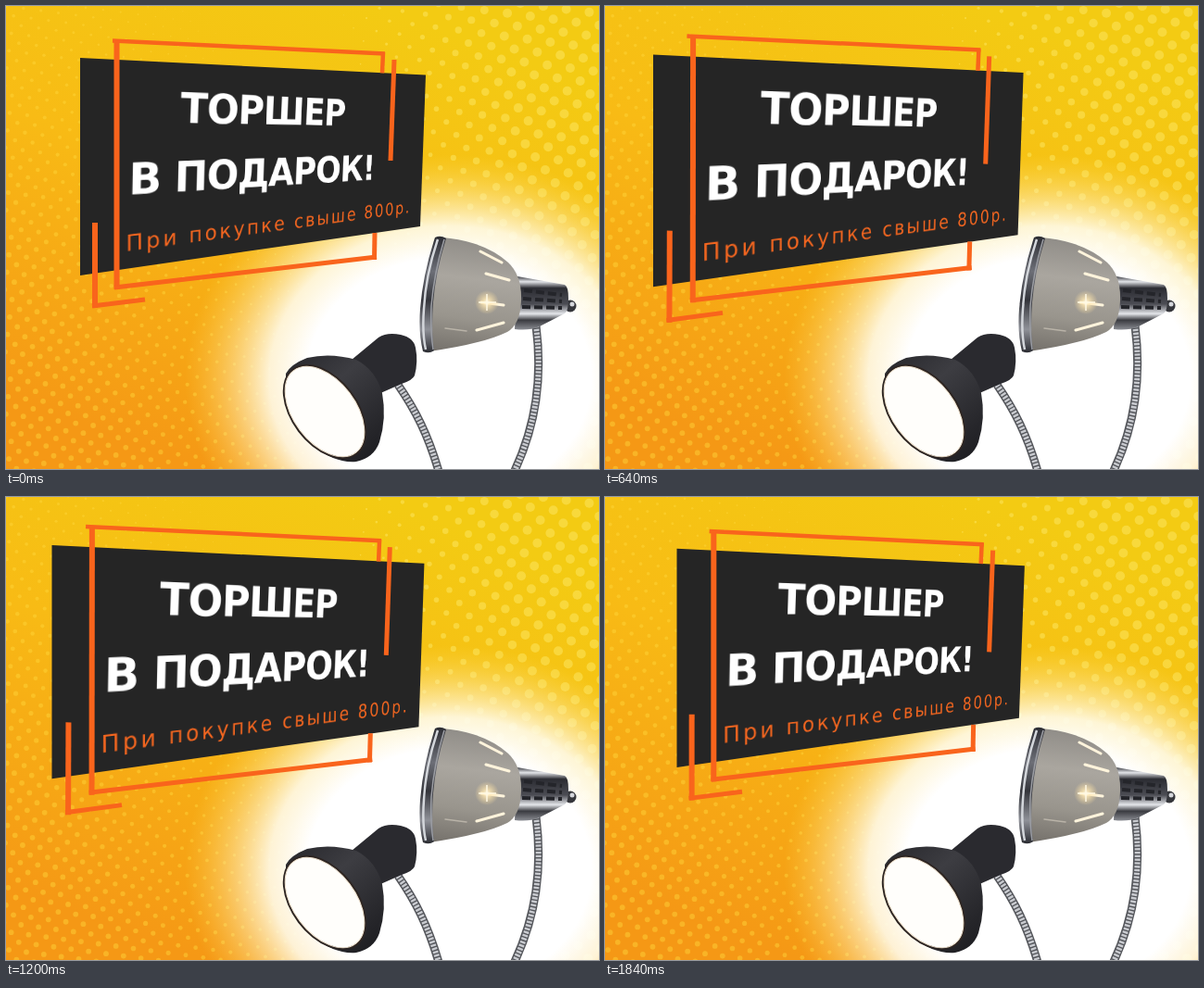
Recreate the animation shown at these times as an HTML page with a canvas. Size 640x500 px, loop 1.92 s.

```html
<!DOCTYPE html>
<html lang="ru">
<head>
<meta charset="utf-8">
<title>Торшер в подарок</title>
<style>
  html, body { margin: 0; width: 100%; height: 100%; overflow: hidden; background: #f5b916; }
  #stage { position: relative; width: 640px; height: 500px; overflow: hidden; }
  #stage > * { position: absolute; left: 0; top: 0; }
  #words { transform-origin: 0 0; overflow: visible; font-family: "DejaVu Sans", sans-serif; text-anchor: middle; }
  .big { font-size: 50px; font-weight: 700; letter-spacing: -1.2px; fill: #fff; }
  .small { font-size: 26px; letter-spacing: 3.3px; fill: #f2651f; }
  #lines { stroke: #f9641c; fill: none; }
</style>
</head>
<body>
<div id="stage">
  <canvas id="back" width="640" height="500"></canvas>
  <svg width="640" height="500" viewBox="0 0 640 500">
    <defs>
      <radialGradient id="glow">
        <stop offset=".54" stop-color="#fff"/>
        <stop offset=".68" stop-color="#fffdf0" stop-opacity=".88"/>
        <stop offset=".82" stop-color="#fff3c0" stop-opacity=".46"/>
        <stop offset="1" stop-color="#ffe060" stop-opacity="0"/>
      </radialGradient>
      <linearGradient id="shade" x1=".4" y1="0" x2=".3" y2="1">
        <stop offset="0" stop-color="#8f8c87"/>
        <stop offset=".35" stop-color="#aaa69f"/>
        <stop offset=".7" stop-color="#99958d"/>
        <stop offset="1" stop-color="#77736d"/>
      </linearGradient>
      <linearGradient id="chrome" x1="0" y1="0" x2="0" y2="1">
        <stop offset="0" stop-color="#3b3c42"/>
        <stop offset=".1" stop-color="#e2e4e8"/>
        <stop offset=".22" stop-color="#2b2c32"/>
        <stop offset=".52" stop-color="#4c4d54"/>
        <stop offset=".7" stop-color="#e4e6ea"/>
        <stop offset=".82" stop-color="#3a3b40"/>
        <stop offset="1" stop-color="#8a8c92"/>
      </linearGradient>
      <linearGradient id="rim" x1="0" y1="0" x2="0" y2="1">
        <stop offset="0" stop-color="#2c2d33"/>
        <stop offset=".3" stop-color="#6d6f77"/>
        <stop offset=".55" stop-color="#34353b"/>
        <stop offset=".8" stop-color="#8f9198"/>
        <stop offset="1" stop-color="#2c2d33"/>
      </linearGradient>
      <linearGradient id="black" x1="0" y1="0" x2=".8" y2="1">
        <stop offset="0" stop-color="#27272b"/>
        <stop offset=".4" stop-color="#3d3d42"/>
        <stop offset="1" stop-color="#1f1f23"/>
      </linearGradient>
      <radialGradient id="bulb">
        <stop offset="0" stop-color="#fffdf0"/>
        <stop offset=".3" stop-color="#ffe9b5" stop-opacity=".8"/>
        <stop offset="1" stop-color="#ffe0a0" stop-opacity="0"/>
      </radialGradient>
    </defs>
    <ellipse cx="478" cy="402" rx="285" ry="242" fill="url(#glow)"/>

    <polygon id="board" fill="#252525"/>
    <g id="lines"></g>

    <g fill="none">
      <g stroke-width="9" stroke="#54565b">
        <path id="cord1" d="M572 345C579 400 573 452 547 506"/>
        <path id="cord2" d="M423 409C441 435 456 463 468 506"/>
      </g>
      <g stroke-width="6" stroke="#c9cbd0" stroke-dasharray="2.4 1.4">
        <path d="M572 345C579 400 573 452 547 506"/>
        <path d="M423 409C441 435 456 463 468 506"/>
      </g>
    </g>

    <g>
      <circle cx="609" cy="324" r="6.5" fill="#35363b"/>
      <circle cx="611" cy="322" r="2.5" fill="#d5d7dc"/>
      <path d="M552 292L603 301Q607 303 607 316Q607 330 603 332L576 346Q565 351 549 349Z" fill="url(#chrome)"/>
      <path d="M559 307L600 312M558 316L600 319M557 325L600 326" stroke="#24252a" stroke-width="4" stroke-dasharray="9 4"/>
      <path d="M471 250Q517 254 542 277Q557 291 556 318Q555 344 541 352Q514 365 457 373Q446 325 471 250Z" fill="url(#shade)"/>
      <path d="M463 250Q469 247 475 251Q464 286 461 320Q459 352 462 372Q457 376 450 373Q445 353 447 327Q450 289 463 250Z" fill="url(#rim)"/>
      <path d="M466 252Q453 290 451 327Q449 353 453 371" fill="none" stroke="#d3d6db" stroke-width="2.5"/>
      <path d="M473 252Q462 288 459 324Q458 351 461 371" fill="none" stroke="#9b9da3" stroke-width="1.5"/>
      <g stroke="#fff4dc" stroke-width="3" stroke-linecap="round">
        <path d="M512 265L535 277M518 289L543 296M513 320L537 323M508 350L537 342"/>
        <path d="M474 348L497 351" stroke="#b9b3a8" stroke-width="1.5"/>
      </g>
      <circle cx="519" cy="320" r="13" fill="url(#bulb)"/>
      <path d="M519 311V329M510 320H529" stroke="#fff9e4" stroke-width="1.5"/>
    </g>

    <g>
      <path d="M373 382L402 358Q411 352 426 355Q440 358 442 369Q445 384 441 399Q439 404 427 408L402 419Z" fill="#2a2a2f"/>
      <path d="M302 397Q307 387 325 380Q350 374 378 382Q399 393 406 418Q411 445 403 471Q397 488 378 492Q354 494 331 474Q300 446 302 397Z" fill="url(#black)"/>
      <g transform="rotate(53 344 438)">
        <ellipse cx="344" cy="438" rx="58" ry="36" fill="#2d2522"/>
        <ellipse cx="344" cy="438" rx="55.5" ry="33.5" fill="#fffefb" stroke="#f3e6d2"/>
      </g>
    </g>
  </svg>
  <svg id="words" width="500" height="235">
    <text class="big" x="230" y="73" transform="rotate(1.4 230 73)">ТОРШЕР</text>
    <text class="big" x="228" y="153" transform="rotate(.8 228 153)">В ПОДАРОК!</text>
    <text class="small" x="264" y="213" transform="rotate(-.5 264 213)">При покупке свыше 800р.</text>
  </svg>
</div>
<script>
const $ = id => document.getElementById(id);
const W = 500, H = 235, STEP = 80, COUNT = 24;

// Each shape: near pose, then far pose
const quad = [[80, 56, 453, 74.5, 447, 238, 80, 291], [41, 51, 451, 71, 445, 251, 41, 308]];
const strokes = [
  [4.5, [115, 37.5, 409, 51.5], [78, 30.5, 404, 46]],
  [6, [119.5, 38, 119.5, 306], [85.5, 30, 85, 326]],
  [5, [117, 304, 400, 271], [82, 323.5, 394, 287]],
  [4.5, [407, 50, 406, 72.3], [402, 45, 401, 68.8]],
  [5, [398, 245, 397.5, 274], [392, 258, 391, 290]],
  [5, [419, 58, 415, 167], [413, 53, 409, 172]],
  [6, [96, 234, 96, 326], [59.5, 246, 59, 348]],
  [5, [93, 324, 150, 317], [56, 345.5, 118, 337]]
];

function paintBack() {
  const c = $('back').getContext('2d');
  const g = c.createLinearGradient(400, 0, 215, 500);
  g.addColorStop(0, '#f3cb13');
  g.addColorStop(.45, '#f8bb15');
  g.addColorStop(1, '#f59815');
  c.fillStyle = g;
  c.fillRect(0, 0, 640, 500);
  dots(c, 12.5, 'rgba(252,226,88,.6)', (x, y) =>
    Math.min(5, (x - 345 - y * .12) / 38));
  dots(c, 9.5, 'rgba(255,214,60,.45)', (x, y) =>
    Math.min(2.9, 3 - x / 150 + (y - 300) / 260));
}

// Staggered halftone on a slightly turned grid
function dots(c, gap, color, size) {
  const cos = Math.cos(.13), sin = Math.sin(.13);
  c.fillStyle = color;
  for (let i = -20; i < 90; i++) for (let j = -20; j < 70; j++) {
    if ((i + j) % 2) continue;
    const x = gap * (i * cos - j * sin), y = gap * (i * sin + j * cos), r = size(x, y);
    if (r < .4) continue;
    c.beginPath();
    c.arc(x, y, r, 0, 7);
    c.fill();
  }
}

const mix = (a, b, p) => a.map((v, i) => v + (b[i] - v) * p);

// Projects the W x H rectangle onto four corners
function project([x0, y0, x1, y1, x2, y2, x3, y3]) {
  const ax = x1 - x2, ay = y1 - y2, bx = x3 - x2, by = y3 - y2;
  const sx = x0 - x1 + x2 - x3, sy = y0 - y1 + y2 - y3;
  const det = ax * by - bx * ay;
  const g = (sx * by - bx * sy) / det, h = (ax * sy - sx * ay) / det;
  const m = [
    (x1 - x0 + g * x1) / W, (y1 - y0 + g * y1) / W, 0, g / W,
    (x3 - x0 + h * x3) / H, (y3 - y0 + h * y3) / H, 0, h / H,
    0, 0, 1, 0, x0, y0, 0, 1
  ];
  return `matrix3d(${m.map(v => v.toFixed(9))})`;
}

const lines = strokes.map(([width]) => {
  const el = document.createElementNS('http://www.w3.org/2000/svg', 'line');
  el.setAttribute('stroke-width', width);
  return $('lines').appendChild(el);
});

function draw(k) {
  const left = Math.max(80 - 3.5 * k, 3.5 * k - 3);
  const p = (80 - left) / 39;
  const corners = mix(...quad, p);
  $('board').setAttribute('points', corners.join(' '));
  $('words').style.transform = project(corners);
  strokes.forEach(([, near, far], i) => {
    const pos = mix(near, far, p);
    ['x1', 'y1', 'x2', 'y2'].forEach((name, n) => lines[i].setAttribute(name, pos[n]));
  });
}

const start = performance.now();
let last = 0;
function tick() {
  const k = Math.floor((performance.now() - start) / STEP) % COUNT;
  if (k !== last) draw(last = k);
  requestAnimationFrame(tick);
}

paintBack();
draw(0);
requestAnimationFrame(tick);
</script>
</body>
</html>
```
